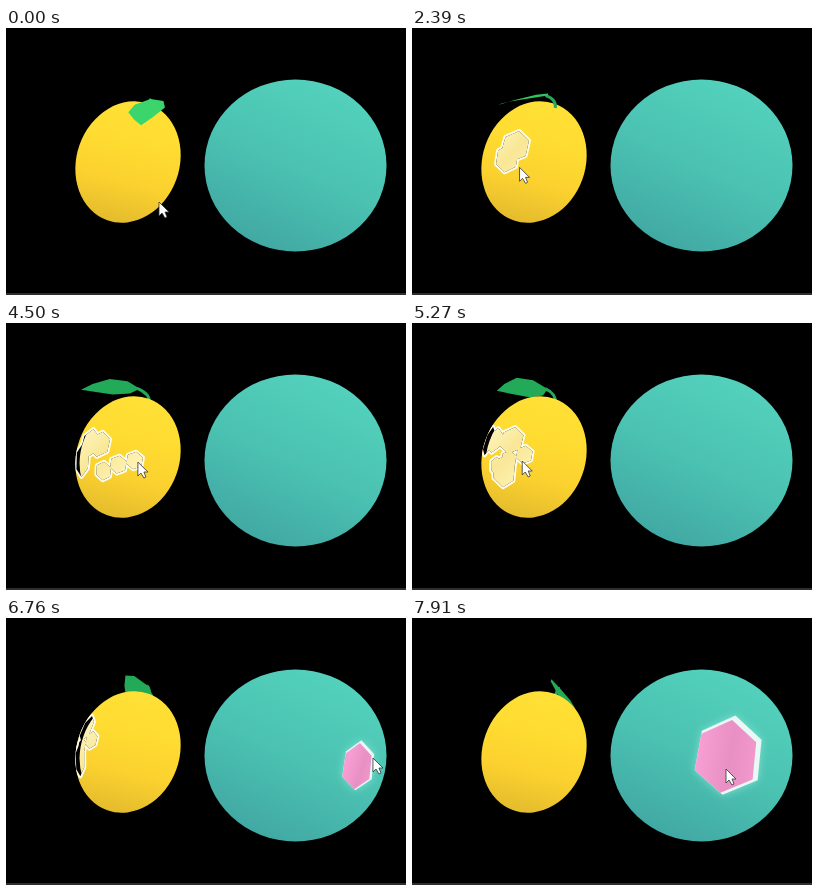
An HTML page with a canvas that plays this animation: 400x267 px, repeating every 7.99 s.

```html
<!DOCTYPE html>
<html lang="en">
<head>
<meta charset="utf-8">
<title>Peeling fruit</title>
<style>
html, body { margin: 0; width: 100%; height: 100%; overflow: hidden; background: #000; }
canvas { display: block; width: 400px; height: 267px; }
</style>
</head>
<body>
<canvas id="stage" width="400" height="267"></canvas>
<script>
const ctx = document.getElementById('stage').getContext('2d');
const LOOP = 7990;
const RAD = Math.PI / 180;
const SPIN = 25.6 * RAD / 1000; // radians per ms
const SPIN_START = 430;
const TILT = 19.6 * RAD; // both fruits turn about an axis leaning right

// a runs along the body's axis, b across it; lean tilts the drawn outline.
const lemon = { cx: 122, cy: 134, a: 61.8, b: 51.4, lean: TILT };
const melon = { cx: 289.5, cy: 137.5, a: 86, b: 91, lean: 0 };

const bite = (body, time, x, y, r) => ({ body, time, x, y, r });
const bites = [
  bite(lemon, 1310, 116, 138, 14),
  bite(lemon, 2100, 108, 120, 16),
  bite(lemon, 2500, 106, 148, 16),
  bite(lemon, 2800, 113, 131, 15),
  bite(lemon, 3100, 121, 131, 13),
  bite(lemon, 4200, 103, 150, 9),
  bite(lemon, 4320, 116, 143, 9),
  bite(lemon, 4440, 130, 138, 9),
  bite(lemon, 4850, 98, 151, 15),
  bite(lemon, 5000, 104, 119, 14),
  bite(melon, 6560, 360, 150, 25),
  bite(melon, 7350, 339, 145, 40)
];

// The pointer visits every bite, with a few rests in between.
const stop = (time, x, y) => ({ time, x, y });
const route = [
  stop(0, 153, 174), stop(80, 153, 174), stop(310, 138, 154), stop(460, 138, 154),
  ...bites.map(b => stop(b.time, b.x + 1, b.y - 1)),
  stop(1470, 116, 132), stop(3250, 118, 143), stop(4500, 132, 139), stop(5270, 110, 138),
  stop(6400, 374, 140), stop(6760, 367, 140), stop(7910, 314, 151)
].sort((p, q) => p.time - q.time);

const clamp = (v, lo, hi) => Math.max(lo, Math.min(hi, v));
const ring = (body, v) => body.b * Math.sqrt(Math.max(0.05, 1 - (v / body.a) ** 2));

// u runs across the axis, v along it.
const toScreen = (body, u, v) => [
  body.cx + u * Math.cos(TILT) + v * Math.sin(TILT),
  body.cy + u * Math.sin(TILT) - v * Math.cos(TILT)
];

function toSurface({ body, x, y }) {
  const dx = x - body.cx, dy = y - body.cy;
  const v = dx * Math.sin(TILT) - dy * Math.cos(TILT);
  const u = dx * Math.cos(TILT) + dy * Math.sin(TILT);
  return { lon: Math.asin(clamp(u / ring(body, v), -1, 1)), v };
}

// Outlines of the hexagonal bites that still face the viewer.
function openBites(body, t) {
  return bites.filter(b => b.body === body && t >= b.time).map(b => {
    const { lon, v } = toSurface(b);
    return { lon: lon - (t - b.time) * SPIN, v, r: b.r };
  }).filter(b => b.lon > -75 * RAD).map(({ lon, v, r }) =>
    Array.from({ length: 6 }, (_, i) => {
      const angle = 0.69 + i * Math.PI / 3;
      const pv = v + r * Math.sin(angle);
      const plon = clamp(lon + r * Math.cos(angle) / ring(body, v), -Math.PI / 2, Math.PI / 2);
      return toScreen(body, ring(body, pv) * Math.sin(plon), pv);
    }));
}

function trace(points) {
  points.forEach((p, i) => i ? ctx.lineTo(...p) : ctx.moveTo(...p));
  ctx.closePath();
}

function fill(points, color) {
  ctx.beginPath();
  trace(points);
  ctx.fillStyle = color;
  ctx.fill();
}

function gradient(x0, y0, x1, y1, ...colors) {
  const g = ctx.createLinearGradient(x0, y0, x1, y1);
  colors.forEach((color, i) => g.addColorStop(i / (colors.length - 1), color));
  return g;
}

function drawBody(body, color, scale = 1) {
  ctx.beginPath();
  ctx.ellipse(body.cx, body.cy, body.b * scale, body.a * scale, body.lean, 0, 2 * Math.PI);
  ctx.fillStyle = color;
  ctx.fill();
}

function drawLemon(t) {
  drawBody(lemon, gradient(137, 75, 108, 194, '#ffe036', '#ffdc31', '#fbd12f', '#e4bc2d'));
  const holes = openBites(lemon, t);
  ctx.save();
  ctx.clip();
  ctx.lineWidth = 4;
  ctx.lineJoin = 'round';
  ctx.strokeStyle = '#fffdf0';
  for (const points of holes) {
    ctx.beginPath();
    trace(points);
    ctx.stroke();
  }
  ctx.restore();
  // The flesh is a smaller body seen through the bites, so bites at the edge notch the outline.
  ctx.save();
  ctx.beginPath();
  holes.forEach(trace);
  ctx.clip();
  drawBody(lemon, '#000', 1.05);
  drawBody(lemon, gradient(75, 105, 122, 150, '#fff6c0', '#f9e796', '#fff2b4'), 0.92);
  ctx.restore();
}

function drawMelon(t) {
  drawBody(melon, gradient(322, 57, 248, 218, '#53d1bc', '#4bc2b2', '#41a8a3'));
  const holes = openBites(melon, t);
  ctx.save();
  ctx.clip();
  ctx.shadowColor = '#7fe0d0';
  ctx.shadowBlur = 8;
  holes.forEach(points => fill(points, '#e8f8f5'));
  ctx.restore();
  for (const points of holes) {
    const [ax, ay] = points.reduce((p, q) => q[0] < p[0] ? q : p);
    const right = Math.max(...points.map(p => p[0]));
    const inner = points.map(([x, y]) => [ax + (x - ax) * 0.92, ay + (y - ay) * 0.92]);
    fill(inner, gradient(ax, ay, right, ay + 10, '#f79fd4', '#e88fc4', '#f59bd0'));
  }
}

// A flat leaf hanging out from the pole and rolled sideways, turning with the lemon.
function drawLeaf(t, turn) {
  const sin = Math.sin(turn), cos = Math.cos(turn);
  const place = (s, side) => {
    const radius = 12 + 57 * s;
    const half = 19 * Math.sin(Math.PI * s ** 0.8) * side;
    const roll = 27 * RAD;
    const u = radius * sin - half * Math.cos(roll) * cos;
    const depth = radius * cos + half * Math.cos(roll) * sin;
    const height = 68 - 22 * s + 10 * s * (1 - s) - half * Math.sin(roll);
    return toScreen(lemon, u, height - 0.1 * depth);
  };
  const steps = [0.2, 0.5, 0.8];
  ctx.beginPath();
  ctx.moveTo(...toScreen(lemon, 2, 58));
  ctx.quadraticCurveTo(...toScreen(lemon, 0, 67), ...place(0.05, 0));
  ctx.lineWidth = 3;
  ctx.strokeStyle = '#24a85a';
  ctx.stroke();
  const light = clamp(cos * 1.2 - 0.2, 0, 1);
  const mix = (dark, bright) => Math.round(dark + (bright - dark) * light);
  fill([place(0, 0), ...steps.map(s => place(s, 1)), place(1, 0), ...steps.reverse().map(s => place(s, -1))],
    `rgb(${mix(34, 58)},${mix(170, 214)},${mix(88, 107)})`);
}

function drawCursor(t) {
  const next = route.findIndex(p => p.time > t);
  const to = route.at(next), from = next > 0 ? route[next - 1] : to;
  const k = to === from ? 0 : (t - from.time) / (to.time - from.time);
  ctx.save();
  ctx.translate(from.x + (to.x - from.x) * k, from.y + (to.y - from.y) * k);
  const arrow = new Path2D('M0 0V14L3 11L6 16L8 15L6 10H10Z');
  ctx.fillStyle = '#fff';
  ctx.fill(arrow);
  ctx.lineWidth = 0.8;
  ctx.strokeStyle = '#333';
  ctx.stroke(arrow);
  ctx.restore();
}

function draw(t) {
  ctx.fillStyle = '#000';
  ctx.fillRect(0, 0, 400, 267);
  ctx.fillStyle = '#2e2e2e';
  ctx.fillRect(0, 265, 400, 2);
  const turn = -Math.max(0, t - SPIN_START) * SPIN;
  const leafBehind = Math.cos(turn) < 0;
  if (leafBehind) drawLeaf(t, turn);
  drawLemon(t);
  if (!leafBehind) drawLeaf(t, turn);
  drawMelon(t);
  drawCursor(t);
}

const start = performance.now();
function tick() {
  draw((performance.now() - start) % LOOP);
  requestAnimationFrame(tick);
}
tick();
</script>
</body>
</html>
```
